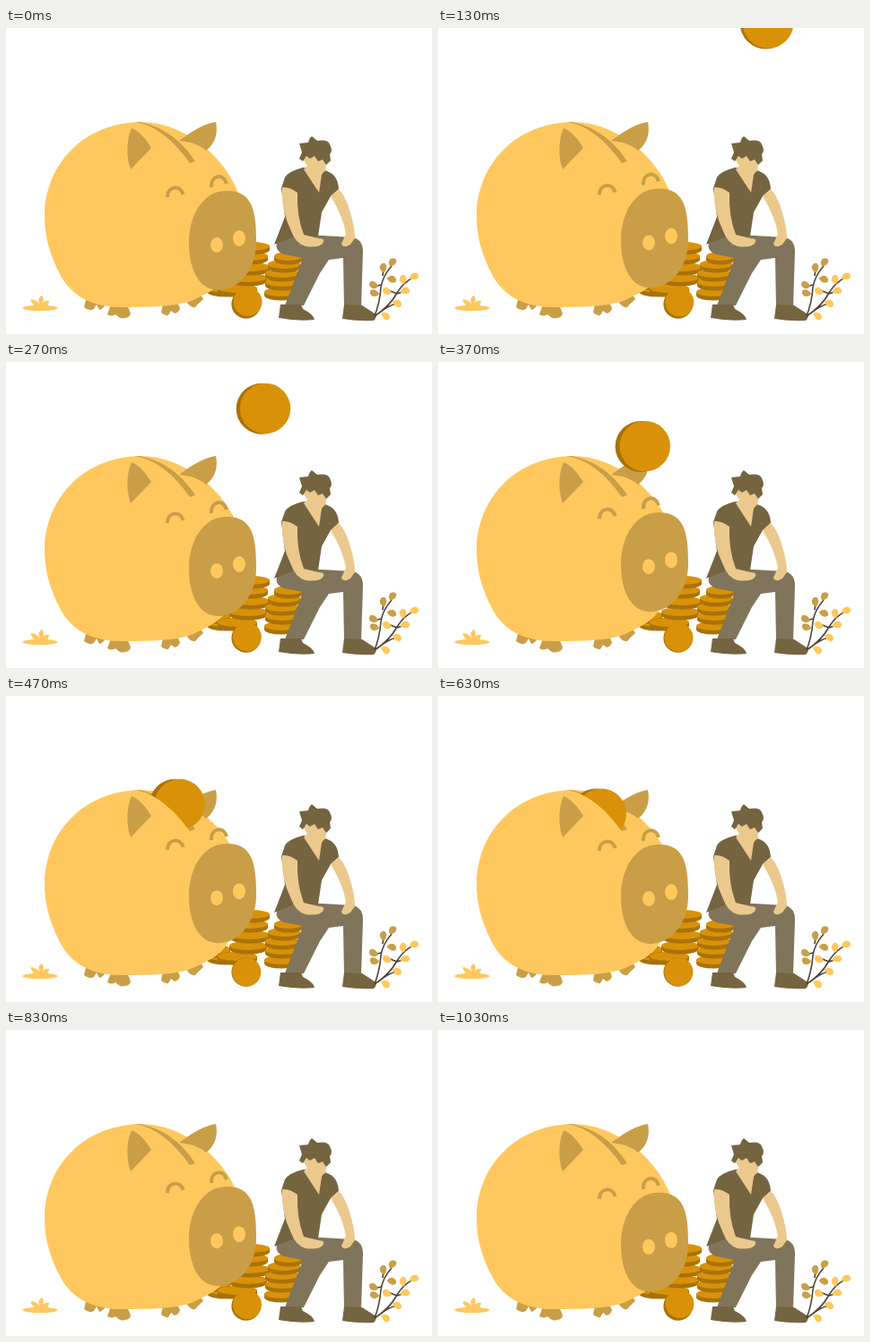
Recreate the animation shown at these times as an HTML page. Size 475 px wide and 342 px high, loop 1060 ms.

```html
<!DOCTYPE html>
<html lang="en">
<head>
<meta charset="utf-8">
<title>Piggy bank</title>
<style>
html, body { margin: 0; height: 100%; overflow: hidden; background: #fff }
svg { display: block }
.gold { fill: #ffc85e }
.tan { fill: #c99e47 }
.face { fill: #d99207 }
.rim { fill: #a87209 }
.skin { fill: #ebc98d }
.cloth { fill: #756440 }
.leg { fill: #80755b }
.line { fill: none; stroke: #c99e47; stroke-width: 4 }
.stem { fill: none; stroke: #4d4335; stroke-width: 1.6 }
</style>
</head>
<body>
<svg width="475" height="342" viewBox="0 0 475 342">
  <clipPath id="aboveSlot"><path d="M0 0V105H142C164 107 186 124 205 151H475V0Z"/></clipPath>

  <g id="sprout" class="gold">
    <ellipse cx="38" cy="313" rx="19.5" ry="3.2"/>
    <path d="M34 312Q27 307 28 303Q35 304 38 309Q34 302 40 299Q43 302 41 308Q43 304 48 305Q48 310 43 313Z"/>
  </g>

  <g id="stacks"></g>

  <g id="pig">
    <path class="tan" d="M90 300L87 312Q93 317 98 314L101 309L104 315Q110 314 111 306Z
      M117 309L113 320Q118 323 122 320Q128 326 132 324Q138 324 139 319L135 309Z
      M175 308L173 318Q177 322 181 321L184 316L188 319Q193 318 194 313L190 305Z
      M203 301L202 307Q206 313 211 312Q214 308 220 303L217 298Z"/>
    <path class="gold" d="M150 105C194 105 240 138 258 182C268 212 262 245 249 272C243 287 230 294 213 302
      C195 312 160 312 125 312C90 311 70 295 60 275C47 250 43 230 43 208C45 150 88 106 150 105Z"/>
    <path class="tan" d="M142 105C164 107 186 124 205 151L211 149C196 126 176 110 148 105Z"/>
    <path class="tan" d="M140 112C134 125 134 145 139 158L162 134C157 126 150 116 140 112Z"/>
    <path class="tan" d="M193 126C203 119 218 107 234 105C236 115 235 128 223 137C215 130 205 127 193 126Z"/>
  </g>
  <g clip-path="url(#aboveSlot)">
    <g id="coin"><circle id="rim" class="rim" r="28.5"/><circle class="face" cx="1.3" cy="-.3" r="28.2"/></g>
  </g>
  <g id="muzzle">
    <path class="line" d="M180 189C180 176 195 175 197.500 186M229 178C228 164 243 162 246 174"/>
    <path class="tan" d="M245 182C274 181 279 203 279 237C280 267 262 293 236 293C214 292 204 268 204 240C204 208 221 182 245 182Z"/>
    <g class="gold"><ellipse cx="235" cy="242.500" rx="7" ry="8.500"/><ellipse cx="260" cy="235" rx="7" ry="9"/></g>
  </g>

  <circle class="rim" cx="267.700" cy="308.500" r="16.300"/>
  <circle id="roller" class="face" cx="268.200" cy="308.500" r="16"/>

  <g id="man">
    <path class="leg" d="M320 231L304 236Q297 248 310 253L331 257L311 310H332L350 274L360 259L376 257L377 312H396L398 250Q398 236 386 234L353 232Z"/>
    <path class="cloth" d="M331 156Q315 160 311 167L307 179L311 211L299 242L322 233H348L352 206L362 188L371 180Q370 164 358 160L352 157Z"/>
    <path class="skin" d="M331 146L340 141L354 145L357 152Q357 161 354 161L352 164L349 184L332 158L336 154Z"/>
    <path class="skin" d="M362 188L371 180Q378 187 383 203Q389 222 389 235L384 242Q376 247 374 241L379 230Q376 211 362 188Z"/>
    <path class="cloth" d="M327 129L337 128Q338 123 341 121L347 126Q359 124 361 130Q365 137 361 141L362 148L357 153L353 147L348 149L344 143L339 146L335 143L331 149L327 146L330 139Z"/>
    <path class="skin" d="M308 178Q306 202 318 227Q323 241 334 244Q348 246 353 241Q357 235 348 235L332 231Q324 210 325 184Q316 177 308 178Z"/>
    <path class="cloth" d="M306 309L304 324Q325 328 344 326Q343 320 331 314L329 309Z
      M377 309L375 325Q395 328 410 327Q415 322 411 319L397 310Z"/>
  </g>
  <g id="plant">
    <path class="stem" d="M411 322Q417 306 418 290Q420 277 430 266M418 287L411 289M420 277L421 268M411 322Q428 311 436 296Q444 283 456 278M436 297L426 293M436 297L445 294M417 318Q426 310 436 308M443 287L444 281"/>
  </g>
</svg>
<script>
const $ = id => document.getElementById(id);
const svgNS = "http://www.w3.org/2000/svg";
const LOOP = 1060, HALF = 530;

function add(parent, tag, attrs) {
  const el = document.createElementNS(svgNS, tag);
  for (const key in attrs) el.setAttribute(key, attrs[key]);
  return parent.appendChild(el);
}

function flatCoin(x, y, rx) {
  add($("stacks"), "path", { class: "rim", d: `M${x - rx} ${y}v4a${rx} 5.500 0 0 0 ${2 * rx} 0v-4Z` });
  add($("stacks"), "ellipse", { class: "face", cx: x, cy: y, rx, ry: 5 });
}

const leaf = (kind, x, y, turn) => add($("plant"), "path", {
  class: kind, d: "M-5.500 0Q-3 -5 2 -4Q6 -2 5 2Q1 6 -5.500 0Z",
  transform: `translate(${x} ${y}) rotate(${turn})`
});

[[246, 291, 22], [236, 283, 14], [258, 291, 22], [270, 279, 21], [272, 267, 22], [271, 255, 21], [272, 244, 22],
 [307, 295, 19], [308, 284, 19], [308, 274, 19], [310, 264, 18], [315, 255, 16]]
  .forEach(c => flatCoin(...c));

[["tan", 431, 262, -60], ["tan", 421, 268, -100], ["tan", 430, 281, 10], ["tan", 410, 287, 200],
 ["tan", 411, 296, 190], ["gold", 455, 278, -25], ["gold", 443, 281, -100], ["gold", 425, 294, 200],
 ["gold", 445, 294, -15], ["gold", 436, 308, 20], ["gold", 423, 322, 30]]
  .forEach(l => leaf(...l));

const ease = p => (1 - Math.cos(Math.PI * p)) / 2;
const move = (id, x, y) => $(id).setAttribute("transform", `translate(${x} ${y})`);

function draw(now) {
  const t = now % LOOP;
  const lift = ease(t / HALF);
  move("muzzle", 0, -17.4 * lift);
  move("roller", 1.3 * (1 - lift), -2.5 * (1 - lift));

  // The coin flies to the slot, then sinks into it.
  const fly = ease(Math.min(t / HALF, 1));
  const sink = ease(Math.max(t - HALF, 0) / HALF);
  move("coin", 397 - 211 * fly - 63 * sink, -27 + 153 * fly + 68 * sink);
  move("rim", -1 - 3 * fly, 0);
  $("coin").setAttribute("visibility", t < 28 ? "hidden" : "visible");
}

function tick() {
  draw(performance.now());
  requestAnimationFrame(tick);
}
tick();
</script>
</body>
</html>
```
